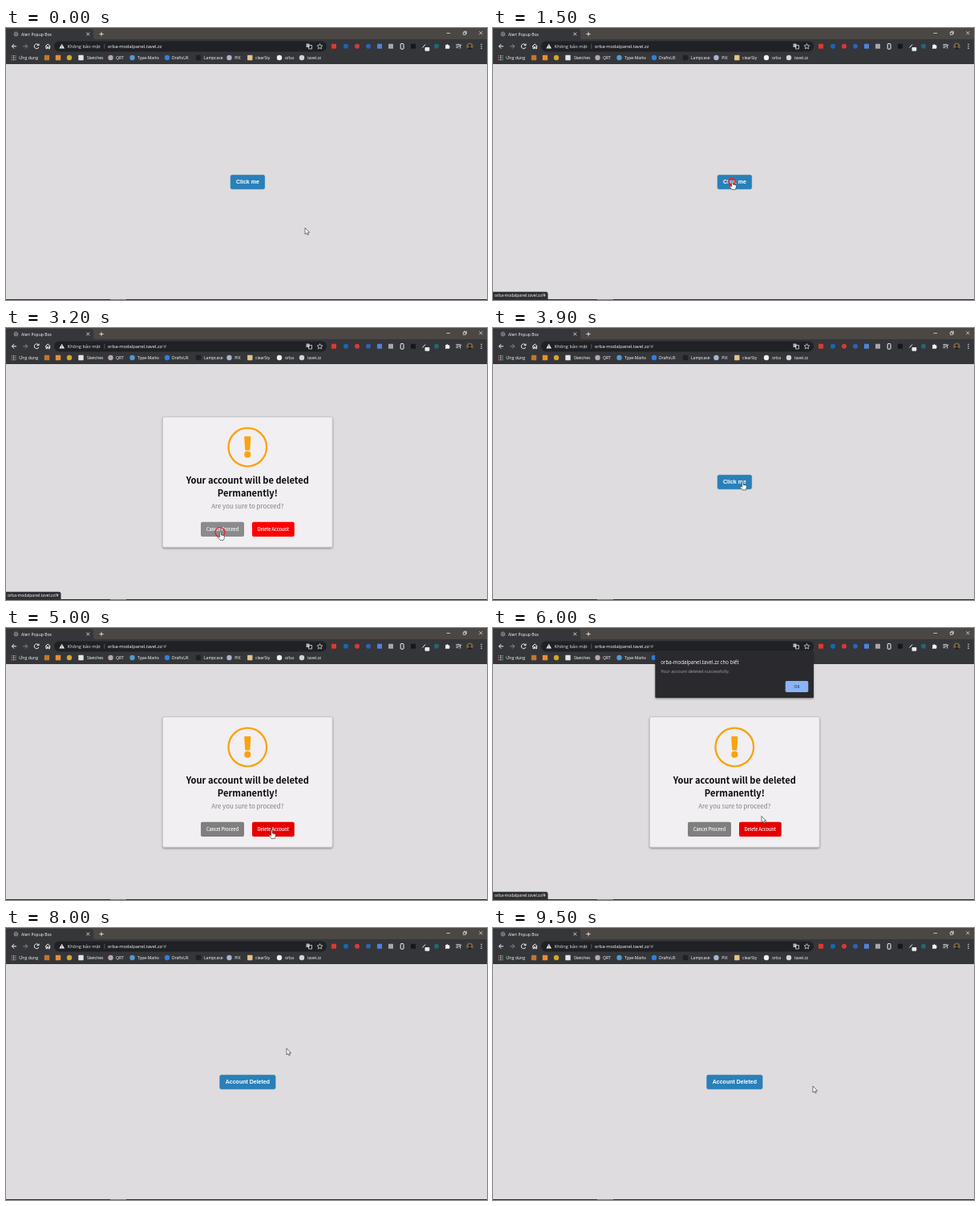
Animation of 600 by 339 pixels, one loop 9700 ms. Source, as an HTML page:

```html
<!DOCTYPE html>
<html lang="vi">
<head>
<meta charset="utf-8">
<title>Alert Popup Box</title>
<style>
  html, body { margin: 0; width: 100%; height: 100%; overflow: hidden; background: #dedcde; }
  svg { display: block; width: 100%; height: 100%; }
  text { font-family: "Open Sans", "Noto Sans", sans-serif; font-weight: 500; fill: #fff; white-space: pre; }
  .url { font-size: 5.75px; }
  .small { font-size: 5px; }
  .dim { fill: #a4a8ad; font-weight: 400; }
  .line { fill: none; stroke: #f4f5f6; stroke-width: 1; }
  .mid { text-anchor: middle; }
  .popup text { font-family: "Noto Sans CJK SC", "Noto Sans CJK JP", "Noto Sans", sans-serif; text-anchor: middle; }
  .popup .title { font-size: 11.1px; font-weight: 700; fill: #0b0b0b; }
  .popup .note { font-size: 7.9px; font-weight: 400; fill: #808080; }
  .popup .label { font-size: 5.6px; stroke: #fff; stroke-width: .12; }
  #openLabel { font: bold 7px "Liberation Sans", Arial, sans-serif; }
</style>
</head>
<body>
<svg viewBox="0 0 600 339" preserveAspectRatio="none">
  <defs>
    <filter id="shadow" x="-10%" y="-10%" width="120%" height="125%">
      <feDropShadow dx="0" dy="1.2" stdDeviation="1.3" flood-opacity=".4"/>
    </filter>
  </defs>
  <rect width="600" height="339" fill="#dedcde"/>

  <!-- page -->
  <rect id="openButton" y="183.25" height="17.5" rx="2" fill="#2980b9" stroke="#2472a4" stroke-width=".5"/>
  <text id="openLabel" class="mid" x="301.4" y="194.3"></text>

  <g id="popup" class="popup">
    <rect x="195.3" y="110.8" width="212" height="162.4" rx="2" fill="#f1eff2" stroke="#b9b7ba" stroke-width=".7" filter="url(#shadow)"/>
    <g fill="#f9a30f">
      <circle cx="301.3" cy="148.5" r="23.8" fill="none" stroke="#f9a30f" stroke-width="2.3"/>
      <path d="M298.3 135h6q1.2 0 1.1 1.2l-1 15q-.1 1.2-1.3 1.2h-3.6q-1.2 0-1.3-1.2l-1-15q-.1-1.2 1.1-1.2z"/>
      <circle cx="301.3" cy="157.7" r="4.1"/>
    </g>
    <text class="title" x="301.3" y="194">Your account will be deleted</text>
    <text class="title" x="301.3" y="210">Permanently!</text>
    <text class="note" x="301.3" y="225">Are you sure to proceed?</text>
    <rect id="cancel" x="243" y="241.7" width="54" height="18.3" rx="2"/>
    <rect id="remove" x="307" y="241.7" width="52.7" height="18.3" rx="2"/>
    <text class="label" x="270" y="253.2">Cancel Proceed</text>
    <text class="label" x="333.2" y="253.2">Delete Account</text>
  </g>

  <!-- browser -->
  <rect width="600" height="14" fill="#4a4744"/>
  <path d="M0 1h106q3 0 3 3v7q0 3 3 3H0z" fill="#35363a"/>
  <rect y="14" width="600" height="31" fill="#35363a"/>
  <circle cx="12.5" cy="7.5" r="2.9" fill="#777b80"/>
  <path d="M10.5 6l2 1 .5 2M13 5l2 1.5" class="line" style="stroke:#45474b;stroke-width:.7"/>
  <text x="19" y="9.5" style="font-size:5.05px">Alert Popup Box</text>
  <path d="M100.4 5.6l3.8 3.8m0-3.8l-3.8 3.8M116.3 7.5h5.4m-2.7-2.7v5.4" class="line" style="stroke-width:.8"/>
  <path d="M549.5 6.5h4.6M570.3 5.3h3v3h-3zM571.4 5.2v-1h3v3h-1M590.3 4.2l4 4m0-4l-4 4" class="line" style="stroke-width:.7"/>
  <path d="M13 22.8H7.6m2.6-2.8l-2.8 2.8 2.8 2.8M40.7 21.3a2.9 2.9 0 1 0 .1 2.8M41 19.6v2.1h-2.2M49 23l3.2-3 3.2 3M50 22.3v3.4h1.4v-2h1.6v2h1.4v-3.4" class="line"/>
  <path d="M21.3 22.8h5.4m-2.6-2.8l2.8 2.8-2.8 2.8" class="line" style="stroke:#85888c"/>
  <rect x="60" y="16.4" width="340" height="13" rx="6.5" fill="#202124"/>
  <path d="M69.7 19.7l3.3 5.8h-6.6z" fill="#f4f5f6"/>
  <path d="M69.7 21.6v1.9m0 .5v.8" class="line" style="stroke:#202124;stroke-width:.7"/>
  <text x="76.8" y="25" class="url" style="fill:#e4e6e8">Không bảo mật</text>
  <path d="M122.8 19.7v6.2" class="line" style="stroke:#6b6e73;stroke-width:.7"/>
  <text x="126.8" y="25" class="url">orba-modalpanel.tavel.zz<tspan id="hash" class="dim">/#</tspan></text>
  <path d="M374.5 19.5h4v4.5h-4z" fill="#aeb2b8"/>
  <path d="M377.5 21.5h4v4.5h-4z" class="line" style="stroke-width:.7"/>
  <path d="M391.5 19.6l1 2.1 2.3.3-1.7 1.6.4 2.3-2-1.1-2 1.1.4-2.3-1.7-1.6 2.3-.3z" class="line" style="stroke-width:.7"/>
  <g id="icons"></g>
  <path d="M548 21.2h1.5q.9-2.2 1.8 0h1.8v1.5q1.8.9 0 1.8v1.3H548v-1.7q1.5-.7 0-1.4z" fill="#f4f5f6"/>
  <path d="M561.4 20.5h5m-5 2h5m-5 2h3m2.3 1.1v-4.4h1.5" class="line" style="stroke-width:.8"/>
  <circle cx="578.5" cy="22.8" r="4.3" fill="#756144"/>
  <path d="M575.2 25.6q3.3-3.4 6.6 0-3.3 3-6.6 0z" fill="#22201e"/>
  <circle cx="578.5" cy="21.8" r="1.6" fill="#22201e"/>
  <path d="M593 19.7v1.2m0 1.3v1.2m0 1.3v1.2" class="line" style="stroke-width:1.2"/>
  <g id="bookmarks"></g>
  <path d="M0 338.5h600" class="line" style="stroke:#29282a"/>
  <path d="M130 338.5h20" class="line" style="stroke:#77757a"/>

  <g id="status">
    <path d="M0 328.8h66q2.5 0 2.5 2.5V339H0z" fill="#303135"/>
    <text x="2" y="335.4" class="small">orba-modalpanel.tavel.zz/#</text>
  </g>

  <g id="dialog">
    <rect x="202.3" y="28" width="197.7" height="59" rx="1.2" fill="#292a2d" filter="url(#shadow)"/>
    <text x="209.3" y="44.6" style="font-size:6.2px">orba-modalpanel.tavel.zz cho biết</text>
    <text x="209.3" y="56.2" class="dim" style="font-size:5.4px">Your account deleted successfully.</text>
    <rect id="confirm" x="364.7" y="66" width="28.6" height="14" rx="1.8"/>
    <text x="379" y="74.9" class="mid small" style="fill:#202124">OK</text>
  </g>

  <circle id="ring" fill="none" stroke="#ec1c2b"/>
  <g id="pointer" stroke="#222" stroke-width=".6" stroke-linejoin="round" fill="#fff">
    <path id="arrow" d="M0 0v8l1.8-1.6 1.2 2.6 1.3-.6-1.1-2.5h2.5z"/>
    <path id="hand" d="M-.4-.2q.9-.9 1.7 0v3.6l3.2.7q1.2.3 1 1.6l-.5 2.4-.7 1.8H0l-2.5-3.2q-.7-1.4.5-1.5l1.6 1.1z"/>
  </g>
</svg>
<script>
const LOOP = 9700, STEP = 100, LAST = 9500;
const $ = id => document.getElementById(id);
const set = (id, attrs) => {
  for (const key in attrs) $(id).setAttribute(key, attrs[key]);
};
const show = (id, on) => set(id, { visibility: on ? "visible" : "hidden" });
const within = (t, from, to) => t >= from && t < to;

const dot = (x, y, color, round, size = 6) =>
  `<rect x="${x - size / 2}" y="${y - size / 2}" width="${size}" height="${size}" rx="${round ? size / 2 : .6}" fill="${color}"/>`;

const extensions = [
  [409, "#d93a32"], [424, "#1767b5", 1], [438, "#d43b38", 1], [452, "#2d62b5", 1], [466, "#4d83dc"],
  [480, "#a5a7aa"], [508, "#161719"], [537, "#246675", 1]
];
$("icons").innerHTML = extensions.map(([x, color, round]) => dot(x, 22.8, color, round)).join("") +
  `<rect x="492.2" y="19.6" width="3.8" height="6.6" rx=".7" class="line"/>
   <path d="M519.5 24.5l3.5-4" class="line"/><rect x="522.5" y="24" width="5.8" height="4.8" rx="1" fill="#e8eaed"/>`;

const bookmarks = [
  [51, "#c1762b"], [65, "#ed8b2d"], [79, "#d4a52b", 1], [93.5, "#e5e5e5", 0, "Sketches", 101],
  [130.5, "#b9a7b1", 1, "QRT", 137], [157.5, "#4f9bd4", 1, "Type-Marks", 164],
  [201, "#2b80e0", 1, "DraftsUX", 207], [240, "#202124", 0, "Lampcase", 247],
  [278.5, "#a9b4cd", 1, "PIX", 285.3], [304.3, "#e3c483", 0, "clearSty", 311],
  [341, "#f1f1f1", 1, "orba", 348], [369, "#d3d5d8", 1, "tavel.zz", 376]
];
const gridColors = ["#e2534b", "#d9d9d9", "#57a866"];
let bar = '<text x="16.3" y="39" style="font-size:5.2px">Ứng dụng</text>';
for (let i = 0; i < 9; i++) {
  bar += dot(7.2 + i % 3 * 2.4, 34.7 + Math.floor(i / 3) * 2.4, gridColors[i % 3], false, 1.5);
}
for (const [x, color, round, name, left] of bookmarks) {
  bar += dot(x, 37, color, round, 6.4);
  if (name) bar += `<text x="${left}" y="39" class="small">${name}</text>`;
}
$("bookmarks").innerHTML = bar;

// time, x, y of the pointer tip
const path = [
  [0, 373, 249], [300, 330, 234], [600, 245, 214], [800, 182, 205], [1000, 228, 198],
  [1300, 298, 191.5], [2000, 298, 191.5], [2500, 276, 235], [2800, 250, 258],
  [3100, 267, 254.5], [3400, 267, 254.5], [3800, 311, 192], [4200, 311, 192],
  [4500, 322, 226], [4800, 331, 252.5], [5600, 331, 252.5], [6100, 336, 230],
  [6500, 350, 150], [6800, 372, 52], [7100, 378.5, 72.5], [7600, 378.5, 72.5],
  [8000, 350, 150], [8400, 310, 190], [8600, 270, 193], [9000, 312, 191],
  [9300, 380, 197], [9400, 397.5, 196.5], [9500, 399, 197]
];
const presses = [1400, 3000, 4050, 4950, 7400];
const toggles = [[1600, 3300], [4200, 7700]];
const statusTimes = [[1300, 1900], [3100, 3700], [4100, 4700], [5100, 6600]];

function pointerAt(t) {
  const i = path.findIndex(p => p[0] >= t);
  if (i < 1) return path[i < 0 ? path.length - 1 : 0].slice(1);
  const [t0, x0, y0] = path[i - 1], [t1, x1, y1] = path[i];
  const k = (t - t0) / (t1 - t0);
  return [x0 + (x1 - x0) * k, y0 + (y1 - y0) * k];
}

function fade(t) {
  const k = Math.min(Math.max(t / 300, 0), 1);
  return k * k * (3 - 2 * k);
}

function draw(now) {
  const t = Math.min(Math.floor(now % LOOP / STEP) * STEP, LAST);
  const [x, y] = pointerAt(t);
  const over = (left, top, right, bottom) => x >= left && x <= right && y >= top && y <= bottom;

  const open = toggles.some(([a, b]) => within(t, a, b));
  const amount = toggles.reduce((sum, [a, b]) => sum + fade(t - a) - fade(t - b), 0);
  const scale = .97 + .03 * amount;
  set("popup", {
    opacity: amount,
    transform: `translate(301.3 192) scale(${scale}) translate(-301.3 -192)`
  });

  const alerting = within(t, 5500, 7600);
  const onCancel = open && over(243, 242, 297, 260);
  const onRemove = open && over(307, 242, 360, 260);
  set("cancel", { fill: onCancel ? "#8b8b8b" : "#7f7f7f" });
  set("remove", { fill: onRemove || within(t, 4800, 7700) ? "#e60000" : "#ff0000" });
  show("dialog", alerting);
  set("confirm", { fill: over(365, 66, 393, 80) ? "#7c9fdd" : "#8ab4f8" });

  const done = t >= 7700;
  const half = done ? 34.7 : 21.3;
  set("openButton", { x: 301.4 - half, width: half * 2 });
  $("openLabel").textContent = done ? "Account Deleted" : "Click me";
  show("hash", t >= 1600);
  show("status", statusTimes.some(([a, b]) => within(t, a, b)));

  const onOpen = !open && over(301.4 - half, 183, 301.4 + half, 201);
  const hand = !alerting && (onOpen || onCancel || onRemove);
  show("hand", hand);
  show("arrow", !hand);
  set("pointer", { transform: `translate(${x} ${y})` });

  const age = t - (presses.find(p => t - p > 50 && t - p <= 200) ?? t);
  show("ring", age > 0);
  set("ring", { cx: x, cy: y, r: 1.8 + age * .021, "stroke-width": 2.6 - age * .007 });
}

function tick() {
  draw(performance.now());
  requestAnimationFrame(tick);
}
tick();
</script>
</body>
</html>
```
